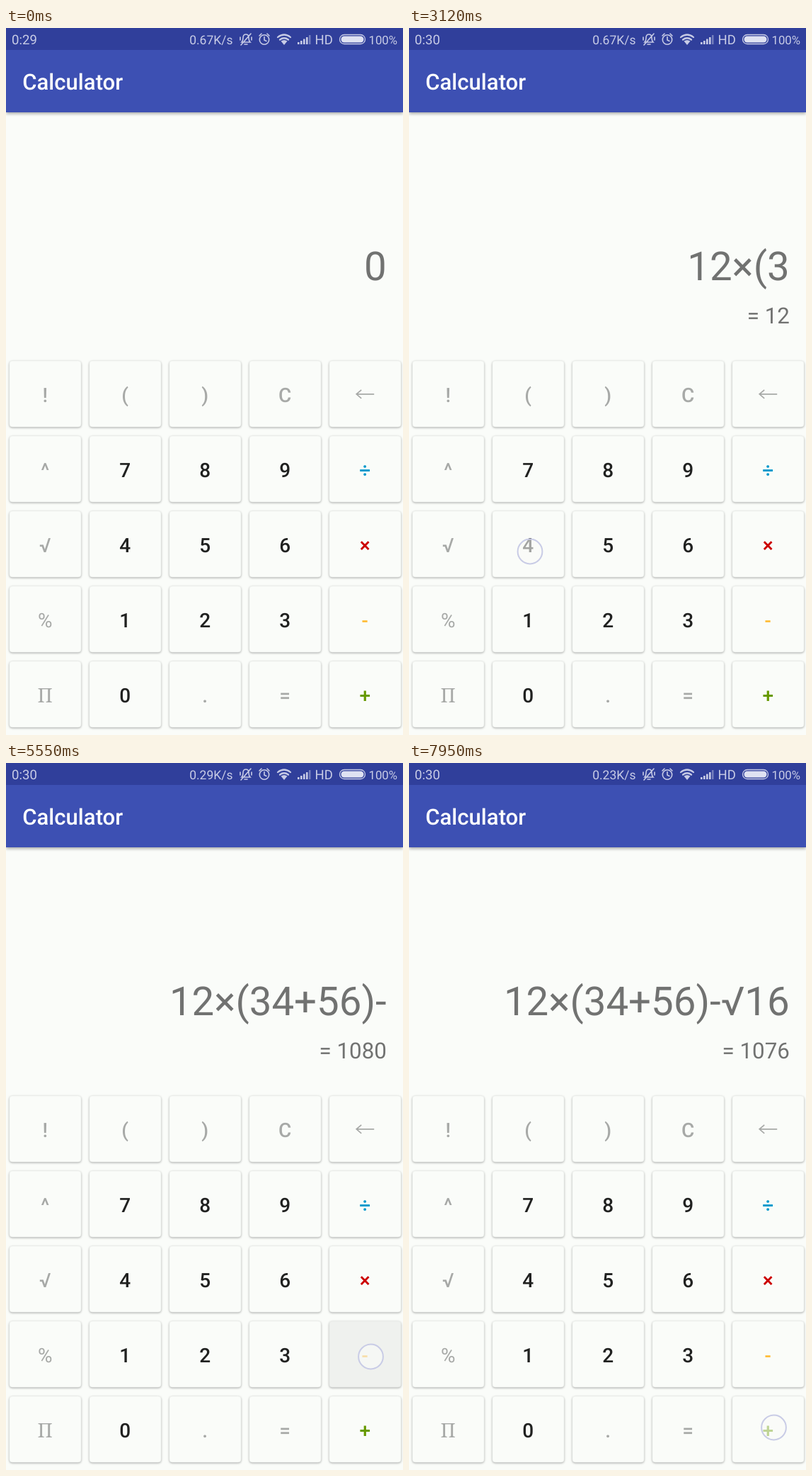
Animation, 561 px wide and 998 px high, one loop 8 s. Source, as an HTML page:

```html
<!DOCTYPE html>
<html lang="en">
<head>
<meta charset="utf-8">
<title>Calculator</title>
<style>
  html, body { margin: 0; width: 100%; height: 100%; overflow: hidden; background: #fafcf9; }
  svg { display: block; font-family: Roboto, "Noto Sans", sans-serif; text-rendering: geometricPrecision; }
  .status text { font-size: 17.5px; }
  .bar { filter: drop-shadow(0 2px 2px #0005); }
  .key { fill: #fafcf9; stroke: #eff1ee; stroke-width: .6; filter: drop-shadow(0 1.3px 1.5px #0005); }
  .label { font-size: 28px; font-weight: 500; text-anchor: middle; }
  .out { fill: #717271; text-anchor: end; }
  .touch { fill: #fafcf999; stroke: #c9cce6; stroke-width: 2; }
</style>
</head>
<body>
<svg id="stage" width="561" height="998" viewBox="0 0 561 998">
  <rect class="bar" y="31" width="561" height="88" fill="#3d50b3"/>
  <rect width="561" height="31" fill="#303f9b"/>
  <text x="23.2" y="87.2" font-size="31.1" font-weight="500" fill="#fff">Calculator</text>

  <g class="status" fill="#c8cce6">
    <text id="clock" x="8" y="23" style="font-size:18.6px"></text>
    <text id="speed" x="320.5" y="23" text-anchor="end"></text>
    <text x="436.5" y="23" style="font-size:18.5px">HD</text>
    <text x="512.5" y="23" style="font-size:16.8px">100%</text>
    <g fill="none" stroke="#c8cce6" stroke-width="1.6" stroke-linecap="round">
      <path d="M333 20q2-2 2-6q0-5 4-5q4 0 4 5q0 4 2 6zM337 23h4M332 24L346 8M331 13v4M347 13v4"/>
      <circle cx="365" cy="16.5" r="6.7"/>
      <path d="M365 12.5v4.5l3 1.5M358 11l3-3M372 11l-3-3"/>
      <path d="M384 13q9-7 18 0M387 16.5q6-4.5 12 0" stroke-width="2.2"/>
    </g>
    <path d="M388.5 18.5q4.5-3 9 0L393 24z"/>
    <path d="M412 20h2.6v3h-2.6zM416 18h2.6v5H416zM420 15.5h2.6v7.5H420zM424 13h2.6v10H424z"/>
    <path d="M428 10h2.5v13H428z" opacity=".45"/>
    <rect x="471.5" y="9.5" width="36" height="13" rx="6.5" fill="none" stroke="#c8cce6" stroke-width="1.3"/>
    <rect x="473.5" y="11.5" width="32" height="9" rx="4.5" fill="#dfe2f2"/>
  </g>

  <text id="expr" class="out" x="537.7" y="356" font-size="56.4"></text>
  <text id="result" class="out" x="537.9" y="417" font-size="31.3"></text>
</svg>
<script>
const LOOP = 8000, PITCH_X = 113, PITCH_Y = 106;
const stage = document.getElementById('stage');
const clamp = v => Math.max(0, Math.min(1, v));

function add(tag, attrs, text = '') {
  const el = document.createElementNS('http://www.w3.org/2000/svg', tag);
  for (const name in attrs) el.setAttribute(name, attrs[name]);
  el.textContent = text;
  return stage.appendChild(el);
}

const LABELS = '!()C←^789÷√456×%123-Π0.=+';
const COLORS = { '÷': '#0099cc', '×': '#cc0000', '-': '#ffbb33', '+': '#669900' };

function keyBox(label) {
  const i = LABELS.indexOf(label);
  return { x: 5 + i % 5 * PITCH_X, y: 470 + Math.floor(i / 5) * PITCH_Y, width: 101, height: 93, rx: 4 };
}

for (const label of LABELS) {
  const box = keyBox(label), x = box.x + 50.2, y = box.y + 57.8;
  add('rect', { class: 'key', ...box });
  if (label === '←') {
    add('path', { d: `M${x + 13} ${y - 11}h-25m7-6l-7 6l7 6`, fill: 'none', stroke: '#a7a9a7', 'stroke-width': 1.7 });
    continue;
  }
  const fill = COLORS[label] || (/\d/.test(label) ? '#202120' : '#a7a9a7');
  const el = add('text', { class: 'label', x, y, fill }, label);
  if (label === '%') el.style.fontWeight = 400;
  if (label === 'Π') el.style.cssText = 'font-family:"Noto Serif",serif;font-weight:400';
}

// key, touch x, touch y, finger down, character entered, result from then on
const TAPS = [
  ['1', 167.5, 840.5, 300, 480, '= 1'],
  ['2', 298, 857, 600, 720, '= 12'],
  ['×', 518, 720, 1620, 1770],
  ['(', 173, 521, 2550, 2670],
  ['3', 385, 845, 2820, 2940],
  ['4', 171, 739, 3120, 3210],
  ['+', 515, 960, 3660, 3750],
  ['5', 284, 735, 3930, 4020],
  ['6', 397, 737, 4200, 4290],
  [')', 270, 519, 4680, 4800, '= 1080'],
  ['-', 515.5, 838, 5460, 5550],
  ['√', 60, 735, 6060, 6180],
  ['1', 190.5, 858.5, 6660, 6780, '= 1079'],
  ['6', 397, 737, 7140, 7200, '= 1076'],
  ['+', 515.5, 938, 7950, 8100]
].map(([key, cx, cy, down, typed, result]) => ({
  key, down, typed, result,
  shade: add('rect', { ...keyBox(key), fill: '#000' }),
  touch: add('circle', { class: 'touch', cx, cy, r: 17.4 })
}));

const fields = {};
for (const id of ['clock', 'speed', 'expr', 'result']) fields[id] = document.getElementById(id);

function show(id, text) {
  if (fields[id].textContent !== text) fields[id].textContent = text;
}

function draw(t) {
  let expr = '', result = '';
  for (const tap of TAPS) {
    const since = t - tap.typed;
    if (since >= 0) {
      expr += tap.key;
      result = tap.result || result;
    }
    tap.touch.style.opacity = t < tap.down ? 0 : clamp((180 - since) / 90);
    tap.shade.style.opacity = since < 0 ? 0 : .042 * clamp((180 - since) / 110);
  }
  show('expr', expr || '0');
  show('result', result);
  show('clock', t < 2310 ? '0:29' : '0:30');
  show('speed', t < 3360 ? '0.67K/s' : t < 7230 ? '0.29K/s' : '0.23K/s');
}

const start = performance.now();
function frame() {
  draw((performance.now() - start) % LOOP);
  requestAnimationFrame(frame);
}
frame();
</script>
</body>
</html>
```
